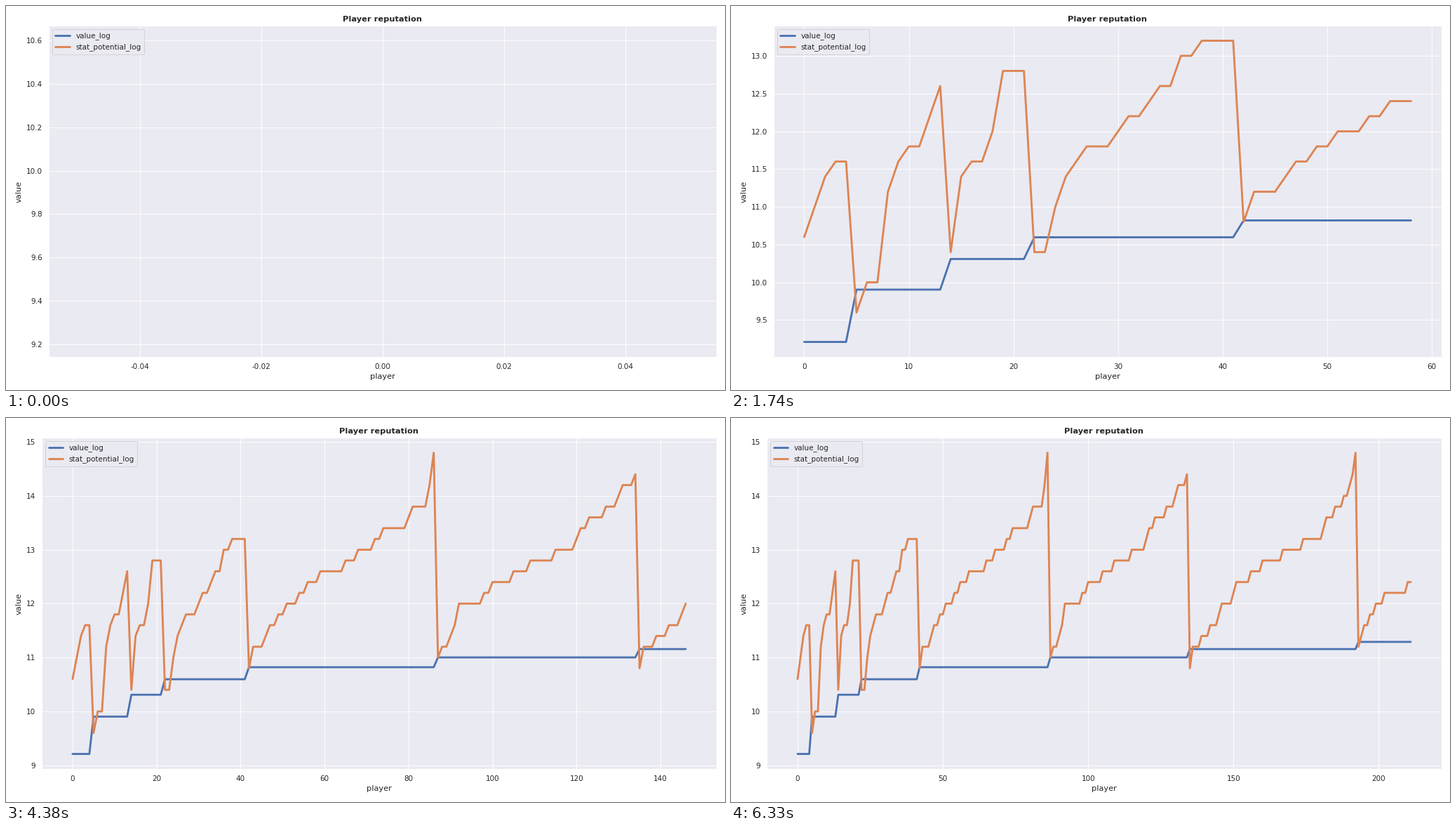
Write a matplotlib script that moves like this. It is 1025 px wide and 547 px high and loops after 6360 ms.

```python
import math

import matplotlib.pyplot as plt
import numpy as np
from matplotlib.animation import FuncAnimation
from matplotlib.ticker import MaxNLocator
from matplotlib.transforms import ScaledTranslation

WIDTH, HEIGHT = 1025, 547
DPI = WIDTH / 15
PX_PER_PT = DPI / 72
TICK_SIZE = 11
TICK_GAP = 9.5
DIGIT_WIDTH = 0.636 * TICK_SIZE * PX_PER_PT

# Plot edges in pixels; the left one depends on the width of the y labels.
TOP, BOTTOM, RIGHT = 28, 500, 1012.7
LEFT_NARROW, LEFT_WIDE = 51.2, 61.1
YLABEL_EDGE = 24

plt.rcParams.update({
    "font.family": "DejaVu Sans",
    "font.size": 12,
    "axes.titlesize": 12,
    "axes.labelsize": 12,
    "legend.fontsize": 11,
    "text.color": "0.15",
    "axes.labelcolor": "0.15",
    "axes.facecolor": "#EAEAF2",
    "axes.edgecolor": "white",
    "axes.linewidth": 1.25,
    "lines.linewidth": 3,
    "lines.solid_capstyle": "round",
})

# One group per value tier: lowest potential, then the number of players
# at that potential and at each whole step above it.
GROUPS = [
    (53, [1, 0, 1, 0, 1, 2]),
    (48, [1, 0, 2, 0, 0, 0, 0, 0, 1, 0, 1, 2, 0, 1, 0, 1]),
    (52, [1, 0, 0, 0, 0, 1, 2, 0, 1, 0, 0, 0, 3]),
    (52, [2, 0, 0, 1, 0, 1, 1, 3, 1, 2, 1, 2, 0, 2, 4]),
    (54, [1, 0, 3, 1, 2, 2, 3, 2, 3, 6, 3, 4, 2, 6, 1, 4, 0, 1, 0, 0, 1]),
    (55, [1, 2, 1, 1, 0, 6, 2, 5, 4, 6, 5, 1, 2, 4, 3, 1, 3, 1]),
    (54, [1, 0, 3, 3, 3, 1, 4, 1, 5, 4, 7, 7, 7, 1, 3, 3, 2, 1, 1, 0, 1]),
    (56, [1, 1, 2, 2, 3, 8, 2]),
]

potential = np.concatenate([
    np.repeat(np.arange(low, low + len(counts)), counts) / 5
    for low, counts in GROUPS
])
value = np.concatenate([
    np.full(sum(counts), np.log(10000 * tier))
    for tier, (_, counts) in enumerate(GROUPS, start=1)
])
player = np.arange(len(value))

# The small surplus keeps the pixel size from being truncated.
fig = plt.figure(
    figsize=((WIDTH + 0.001) / DPI, (HEIGHT + 0.001) / DPI), dpi=DPI)
ax = fig.add_axes([0.1, 0.1, 0.8, 0.8])
value_line, = ax.plot([], [], color="#4C72B0", label="value_log")
potential_line, = ax.plot([], [], color="#DD8452", label="stat_potential_log")

ax.set_xticks([])
ax.set_yticks([])
ax.set_title("Player reputation", fontweight="bold", pad=6)
ax.set_xlabel("player", labelpad=24.5)
ax.set_ylabel("value")
ax.legend(loc="upper left")

locator = MaxNLocator(nbins=9, steps=[1, 2, 2.5, 5, 10])


def shift(dx, dy):
    return ScaledTranslation(dx / 72, dy / 72, fig.dpi_scale_trans)


def make_ticks(add_line, transform, ha, va):
    """Reusable pairs of grid line and label."""
    return [
        (add_line(0, color="white", lw=1, zorder=0.9, solid_capstyle="butt"),
         ax.text(0, 0, "", transform=transform, ha=ha, va=va,
                 fontsize=TICK_SIZE))
        for _ in range(12)
    ]


x_ticks = make_ticks(ax.axvline, ax.get_xaxis_transform() + shift(0, -TICK_GAP),
                     "center", "top")
y_ticks = make_ticks(ax.axhline, ax.get_yaxis_transform() + shift(-TICK_GAP, 0),
                     "right", "center_baseline")


def limits(data):
    low, high = float(data.min()), float(data.max())
    if low == high:
        return -0.055, 0.055
    margin = 0.05 * (high - low)
    return low - margin, high + margin


def place_ticks(ticks, low, high, horizontal):
    spots = [round(t, 10) + 0.0 for t in locator.tick_values(low, high)
             if low <= t <= high]
    step = spots[1] - spots[0]
    decimals = next(d for d in range(6)
                    if math.isclose(step * 10**d, round(step * 10**d)))
    for i, (line, text) in enumerate(ticks):
        used = i < len(spots)
        line.set_visible(used)
        text.set_visible(used)
        if not used:
            continue
        spot = spots[i]
        text.set_text(f"{spot:.{decimals}f}")
        if horizontal:
            line.set_xdata([spot, spot])
            text.set_x(spot)
        else:
            line.set_ydata([spot, spot])
            text.set_y(spot)
    return spots[-1], decimals


def label_width(number, decimals):
    label = f"{number:.{decimals}f}"
    return DIGIT_WIDTH * (len(label) - 0.5 * label.count("."))


def update(i):
    shown = slice(0, i + 1)
    value_line.set_data(player[shown], value[shown])
    potential_line.set_data(player[shown], potential[shown])

    x_low, x_high = limits(player[shown])
    y_low, y_high = limits(np.append(value[shown], potential[shown]))
    ax.set_xlim(x_low, x_high)
    ax.set_ylim(y_low, y_high)
    last, x_decimals = place_ticks(x_ticks, x_low, x_high, True)
    _, y_decimals = place_ticks(y_ticks, y_low, y_high, False)

    # Make room on the right when the last x label sticks out.
    left = LEFT_WIDE if y_decimals else LEFT_NARROW
    gap = (x_high - last) / (x_high - x_low) * (RIGHT - left)
    right = RIGHT - max(0, label_width(last, x_decimals) / 2 - gap)
    ax.set_position([left / WIDTH, 1 - BOTTOM / HEIGHT,
                     (right - left) / WIDTH, (BOTTOM - TOP) / HEIGHT])
    ax.yaxis.labelpad = (left - YLABEL_EDGE) / PX_PER_PT
    return value_line, potential_line


anim = FuncAnimation(fig, update, frames=len(player), interval=30,
                     init_func=lambda: update(0), repeat=True, repeat_delay=0)

plt.show()
```
